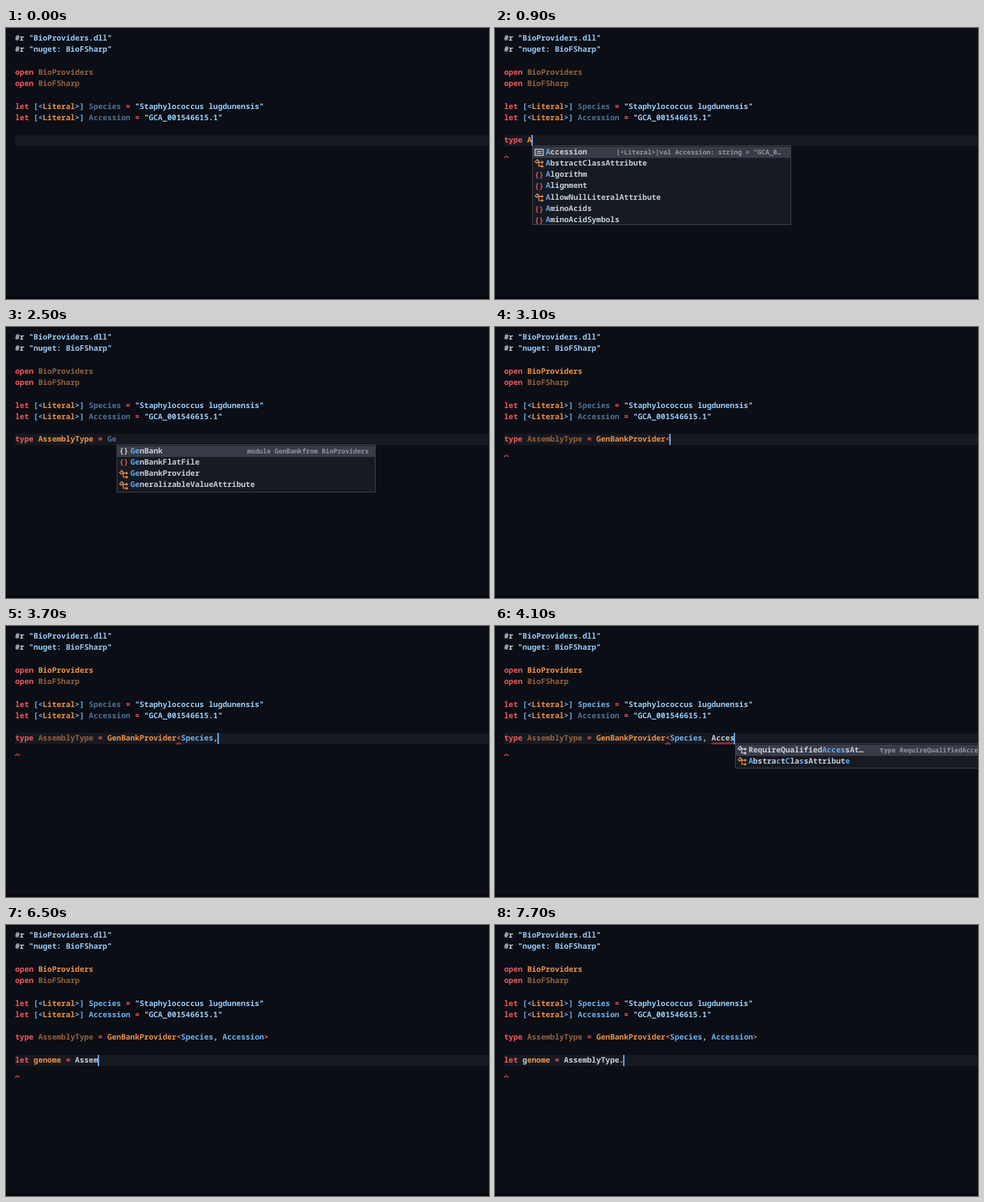
Recreate the animation shown at these times as an HTML page. Size 690x388 px, loop 8000 ms.

```html
<!DOCTYPE html>
<html lang="en">
<head>
<meta charset="utf-8">
<title>Editor typing</title>
<style>
  html, body { margin: 0; width: 100%; height: 100%; overflow: hidden; background: #0b0e15; }
  #stage {
    position: relative; width: 690px; height: 388px; overflow: hidden; background: #0b0e15;
    font: 600 10.97px/16.27px "Noto Sans Mono", monospace;
    font-variant-ligatures: none; text-rendering: geometricPrecision; white-space: pre;
  }
  #stage * { position: absolute; }
  .foot { left: 0; top: 384px; width: 690px; height: 4px; background: #06080d; }
  .line { left: 13px; width: 677px; height: 16px; background: #161920; }
  .caret { width: 2px; height: 16px; background: #62a8f2; }
  .wave { left: 0; top: 0; fill: none; stroke: #e8484f; stroke-width: 1.1; }
  .w { color: #c6ced8; }
  .k { color: #f2575c; }
  .o { color: #ee9145; }
  .od { color: #94613a; }
  .b { color: #6bb2f0; }
  .bd { color: #4d7298; }
  .s { color: #98cbf6; }
  .popup {
    top: 168px; width: 368px; max-height: 112px; overflow: hidden;
    background: #161a22; border: 1px solid #3e434c;
  }
  .row { left: 0; width: 100%; height: 16.3px; color: #c6ced8; }
  .row.sel { background: #393c46; }
  .row .name { left: 18.3px; }
  #stage .name b { position: static; font-weight: inherit; color: #62a8f2; }
  .row .info { font-size: 9.35px; color: #8f959f; }
  .icon { left: 1.8px; top: 1.5px; width: 14px; height: 14px; fill: none; stroke-width: 1.5; }
  .brace { left: 2.3px; color: #dc5260; }
  .cls { stroke: #e58a42; }
  .val { stroke: #6bb2f0; }
  .sel .icon { stroke: #c6ced8; }
  .sel .brace { color: #c6ced8; }
</style>
</head>
<body>
<div id="stage"></div>
<script>
const LOOP = 8000, CELL = 6.585, ROW = 16.27, ITEM = 16.3;
const stage = document.getElementById('stage');
const x = col => 13 + col * CELL;
const y = row => 7 + row * ROW;
const esc = s => s.replace(/&/g, '&amp;').replace(/</g, '&lt;');

// [time, characters typed so far]
const typeKeys = [
  [500, 1], [600, 2], [700, 4], [800, 5], [900, 6], [1000, 7], [1100, 8], [1200, 9],
  [1400, 11], [1500, 12], [1600, 14], [1700, 16], [1800, 17], [1900, 19], [2000, 20],
  [2200, 21], [2400, 22], [2800, 35], [3100, 36], [3200, 37], [3300, 38], [3400, 39],
  [3500, 41], [3600, 43], [3700, 44], [3800, 45], [3900, 46], [4000, 48], [4100, 50],
  [4200, 51], [4300, 52], [4400, 55]
];
const letKeys = [
  [4900, 1], [5000, 3], [5100, 4], [5200, 5], [5300, 8], [5400, 10], [5600, 11],
  [5800, 12], [6000, 13], [6200, 14], [6300, 15], [6400, 17], [6500, 18], [6600, 20],
  [6700, 21], [6900, 22], [7000, 23], [7100, 25], [7200, 26]
];
const typed = (keys, t) => keys.reduce((n, [at, len]) => t >= at ? len : n, 0);

// Suggestions: icon kind, name with _matched_ parts, detail, detail offset
const val = (name, value, mark) => ['val', mark, `[<Literal>]val ${name}: string = "${value}…`, 120];
const accession = mark => val('Accession', 'GCA_0', mark);
const species = mark => val('Species', 'Staphyl', mark);
const require = mark => ['cls', mark, 'type RequireQualifiedAccessAttribute', 207];
const listA = [
  accession('_A_ccession'), ['cls', '_A_bstractClassAttribute'], ['ns', '_A_lgorithm'],
  ['ns', '_A_lignment'], ['cls', '_A_llowNullLiteralAttribute'], ['ns', '_A_minoAcids'],
  ['ns', '_A_minoAcidSymbols']
];
const listGe = [
  ['ns', '_Ge_nBank', 'module GenBankfrom BioProviders', 186],
  ['ns', '_Ge_nBankFlatFile', 'module GenBankFlatFilefrom BioProviders', 142],
  ['cls', '_Ge_nBankProvider', 'type GenBankProviderfrom BioProviders', 153],
  ['cls', '_Ge_neralizableValueAttribute']
];
const listG = listGe.map(([kind, name, ...rest]) => [kind, name.replace('Ge_', 'G_e'), ...rest])
  .concat([['ns', 'Al_g_orithm'], ['ns', 'Ali_g_nment']]);
const listS = [
  species('_S_pecies'), ['cls', '_S_ealedAttribute'], ['cls', '_S_tructAttribute'],
  ['cls', 'Ab_s_tractClassAttribute'], ['ns', 'AminoAcid_s_'], ['ns', 'AminoAcid_S_ymbols'],
  require('RequireQualifiedAcce_s_sAt…')
];

// [start, end, list, selected]
const popups = [
  [900, 1000, listA, 0],
  [1000, 1100, [['cls', '_A_b_s_tractClassAttribute'], ['ns', '_A_minoAcid_s_'], ['ns', '_A_minoAcid_S_ymbols']], 0],
  [1100, 1300, [['cls', '_A_bstractCla_ss_Attribute'], ['ns', '_A_minoAcid_S_ymbol_s_']], 0],
  [2300, 2400, listG, 0],
  [2400, 2600, listGe, 0],
  [2600, 2700, listGe, 1],
  [2700, 2800, listGe, 2],
  [3200, 3300, listS, 0],
  [3300, 3500, [species('_Sp_ecies')], 0],
  [3500, 3700, [species('_Speci_es')], 0],
  [3900, 4000, listA, 0],
  [4000, 4100, [
    accession('_Acc_ession'), require('RequireQualified_Acc_essAt…'),
    ['cls', '_A_bstra_c_t_C_lassAttribute'], ['cls', 'Unauthorized_Acc_essException']
  ], 0],
  [4100, 4200, [require('RequireQualified_Acces_sAt…'), ['cls', '_A_bstra_c_t_C_la_s_sAttribut_e_']], 0],
  [4200, 4300, [require('RequireQualified_Access_At…')], 0]
];

const icons = {
  ns: '<span class="brace" style="top:.5px">{}</span>',
  cls: '<svg class="icon cls" viewBox="0 0 16 16"><path d="M1.5 5 5 1.5 7.5 4 4 7.5ZM6 6H12M7.5 6V12.5H12M11.5 6l1.5-1.5 1.5 1.5-1.5 1.5ZM11.5 12.5l1.5-1.5 1.5 1.5-1.5 1.5Z"/></svg>',
  val: '<svg class="icon val" viewBox="0 0 16 16"><path d="M1.5 3H14.5V13H1.5ZM4 6.5H12M4 9.5H12"/></svg>'
};

function code(row, tokens, count = Infinity) {
  let col = 0, html = '';
  for (const [cls, text] of tokens) {
    const part = text.slice(0, Math.max(0, count - col));
    html += `<span class="${cls}" style="left:${x(col)}px;top:${y(row)}px">${esc(part)}</span>`;
    col += text.length;
  }
  return html;
}

function wave(row, col, chars) {
  const half = CELL / 3;
  const d = `M${x(col)} ${y(row + 1) - 1.7}q${half / 2} 2.4 ${half} 0` + `t${half} 0`.repeat(chars * 3 - 1);
  return `<svg class="wave" width="690" height="388"><path d="${d}"/></svg>`;
}

function popup(col, list, selected) {
  const rows = list.map(([kind, mark, info, offset], i) => {
    const name = mark.split('_').map((s, j) => j % 2 ? `<b>${s}</b>` : s).join('');
    const on = i === selected;
    const detail = on && info ? `<span class="info" style="left:${offset - 1}px">${esc(info)}</span>` : '';
    return `<div class="row${on ? ' sel' : ''}" style="top:${i * ITEM + 0.5}px">${icons[kind]}<span class="name">${name}</span>${detail}</div>`;
  }).join('');
  return `<div class="popup" style="left:${x(col) + 0.6}px;height:${list.length * ITEM + 1.4}px">${rows}</div>`;
}

const literal = (lit, name, value) => [
  ['k', 'let '], ['b', '[<'], ['o', 'Literal'], ['b', '>] '],
  [lit ? 'b' : 'bd', name], ['k', ' = '], ['s', `"${value}"`]
];

function draw(t) {
  const resolved = t >= 3000;
  const n = typed(typeKeys, t), m = typed(letKeys, t);
  const row = t < 4700 ? 9 : t < 4800 ? 10 : 11;
  const col = row === 9 ? n : m;
  const caretOn = t >= 100 && !(t >= 2500 && t < 2800) && !(t >= 7500 && t < 7700);

  let html = `<div class="foot"></div><div class="line" style="top:${y(row)}px"></div>`;
  html += code(0, [['w', '#r '], ['s', '"BioProviders.dll"']]);
  html += code(1, [['w', '#r '], ['s', '"nuget: BioFSharp"']]);
  html += code(3, [['k', 'open '], [resolved ? 'o' : 'od', 'BioProviders']]);
  html += code(4, [['k', 'open '], ['od', 'BioFSharp']]);
  html += code(6, literal(t >= 3800, 'Species', 'Staphylococcus lugdunensis'));
  html += code(7, literal(t >= 4500, 'Accession', 'GCA_001546615.1'));
  html += code(9, [
    ['k', 'type '], [resolved ? 'od' : 'o', 'AssemblyType'], ['k', ' = '],
    [resolved ? 'o' : 'bd', 'GenBankProvider'], ['k', '<'],
    [t < 3700 ? 'w' : 'b', 'Species'], ['w', ', '],
    [t < 4500 ? 'w' : 'b', 'Accession'], ['k', '>']
  ], n);
  html += code(11, [
    ['k', 'let '], [t < 7500 ? 'o' : 'w', 'g'], ['o', 'enome'], ['k', ' = '], ['w', 'AssemblyType.']
  ], m);

  if ((t >= 800 && t < 2300) || (t >= 3000 && t < 4700)) html += wave(10, 0, 1);
  if (t >= 5000) html += wave(12, 0, 1);
  if (t >= 3700 && t < 4500) {
    html += wave(9, 35, 1);
    if (n > 45) html += wave(9, 45, Math.min(n, 54) - 45);
  }
  if (caretOn) html += `<div class="caret" style="left:${x(col) - 1}px;top:${y(row)}px"></div>`;

  const open = popups.find(([from, to]) => t >= from && t < to);
  if (open) html += popup(n, open[2], open[3]);
  stage.innerHTML = html;
}

let last = -1;
function tick() {
  const step = Math.floor(performance.now() % LOOP / 100);
  if (step !== last) draw((last = step) * 100);
  requestAnimationFrame(tick);
}
tick();
</script>
</body>
</html>
```
